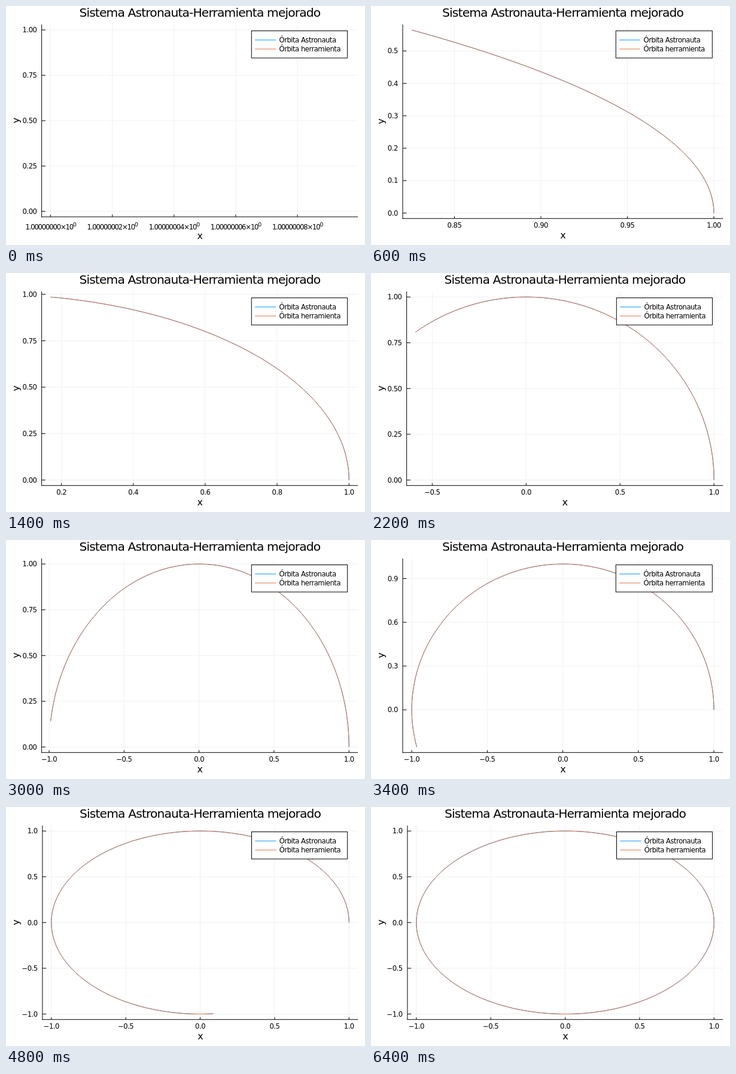
Animation, 600 px wide and 400 px high, one loop 6600 ms. Source, as an HTML page:

```html
<!DOCTYPE html>
<html lang="es">
<head>
<meta charset="utf-8">
<title>Sistema Astronauta-Herramienta</title>
<style>
html, body { margin: 0; width: 100%; height: 100%; overflow: hidden; background: #fff; }
svg { display: block; width: 600px; height: 400px; font-family: "DejaVu Sans", sans-serif; }
text { letter-spacing: -0.043em; }
.power { letter-spacing: -0.1em; }
</style>
</head>
<body>
<svg id="plot" viewBox="0 0 600 400" xmlns="http://www.w3.org/2000/svg"></svg>
<script>
const STEP_MS = 200, STEPS = 33, TURN = 0.2;
const TOP = 31, RIGHT = 588.2;
const BLUE = "#009afa", CORAL = "#e26f46";
const SMALL = 11.6, GUIDE = 16, TITLE = 20.3;
const svg = document.getElementById("plot");

const line = (x1, y1, x2, y2, color) =>
  `<path d="M${x1} ${y1}L${x2} ${y2}" stroke="${color}" fill="none"/>`;

const text = (x, y, str, size, anchor = "middle", extra = "") =>
  `<text x="${x}" y="${y}" font-size="${size}" text-anchor="${anchor}" ${extra}>${str}</text>`;

function widen(lo, hi) {
  const pad = 0.03 * (hi - lo);
  return [lo - pad, hi + pad];
}

// Picks the tick step by granularity, coverage, niceness and reach of zero.
function pickTicks([lo, hi]) {
  const nice = [[5, 0.9], [3, 0.2], [2.5, 0.5], [2, 0.7], [1, 1]];
  const span = hi - lo;
  let best = { score: -Infinity };
  for (let z = 0; z >= -4; z--) {
    for (const [q, quality] of nice) {
      const step = q * 10 ** z;
      const first = Math.ceil(lo / step), last = Math.floor(hi / step);
      const count = last - first + 1;
      if (count < 4 || count > 8) continue;
      const from = Math.min(0, first - 1), to = last + 1;
      const zero = (to - from) * step < 2 * span ? 1 : 0;
      const score = (1 - Math.abs(count - 5) / 5) / 4 + zero / 6 +
        0.5 * span / ((count - 1) * step) + quality / 4;
      if (score > best.score + 1e-9) best = { score, step, first, count };
    }
  }
  let digits = 1;
  while (Math.abs(best.step * 10 ** digits - Math.round(best.step * 10 ** digits)) > 1e-6) digits++;
  return Array.from({ length: best.count }, (_, i) => {
    const value = (best.first + i) * best.step;
    const label = Math.abs(value).toFixed(digits);
    return { value, label: (value < -1e-9 ? "\u2212" : "") + label };
  });
}

function limits(angle) {
  const x = angle > Math.PI ? -1 : Math.cos(angle);
  const yMax = angle > Math.PI / 2 ? 1 : Math.sin(angle);
  const yMin = angle > 1.5 * Math.PI ? -1 : Math.min(0, Math.sin(angle));
  return [widen(x, 1), widen(yMin, yMax)];
}

function leftEdge(ticks) {
  if (ticks[0].label[0] === "\u2212") return 60.9;
  return ticks[0].label.length > 3 ? 59.6 : 53;
}

function orbit(angle, px, py) {
  const n = Math.ceil(angle * 60);
  let d = "";
  for (let i = 0; i <= n; i++) {
    const a = angle * i / n;
    d += (i ? "L" : "M") + px(Math.cos(a)).toFixed(2) + " " + py(Math.sin(a)).toFixed(2);
  }
  return [BLUE, CORAL].map(c => `<path d="${d}" fill="none" stroke="${c}"/>`).join("");
}

function legend(left) {
  const x = 410.3 + (left - 59.6) * 0.16;
  const right = RIGHT - (RIGHT - left) / 30;
  const row = (y, color, label) =>
    line(x + 5.8, y, x + 41, y, color) + text(x + 46.3, y + 4.2, label, SMALL, "start");
  return `<rect x="${x}" y="41.6" width="${right - x}" height="45.4" fill="#fff" stroke="#000"/>` +
    row(56.9, BLUE, "Órbita Astronauta") + row(72, CORAL, "Órbita herramienta");
}

function draw(k) {
  const angle = k * TURN, start = k === 0;
  const bottom = start ? 352.9 : 355.7;
  // At the start x is measured in units of 1e-8 above one.
  const [xLim, yLim] = start ? [widen(0, 9.67), widen(0, 1)] : limits(angle);
  const yTicks = pickTicks(yLim);
  const xTicks = start
    ? [0, 2, 4, 6, 8].map(v => ({ value: v, label: `1.0000000${v}×10<tspan dy="-5" font-size="9.3">0</tspan>` }))
    : pickTicks(xLim);
  const left = leftEdge(yTicks);
  const px = v => left + (v - xLim[0]) / (xLim[1] - xLim[0]) * (RIGHT - left);
  const py = v => bottom - (v - yLim[0]) / (yLim[1] - yLim[0]) * (bottom - TOP);
  const midX = (left + RIGHT) / 2, midY = (TOP + bottom) / 2;
  const tickX = 0.012 * (RIGHT - left), tickY = 0.012 * (bottom - TOP);
  let grid = "", axes = "", labels = "";

  for (const t of xTicks) {
    const x = px(t.value);
    grid += line(x, TOP, x, bottom, "#f0f0f0");
    axes += line(x, bottom, x, bottom - tickY, "#000");
    labels += text(x, start ? 373.5 : 371.2, t.label, SMALL, "middle", start ? 'class="power"' : "");
  }
  for (const t of yTicks) {
    const y = py(t.value);
    grid += line(left, y, RIGHT, y, "#f0f0f0");
    axes += line(left, y, left + tickX, y, "#000");
    labels += text(left - 8.2, y + 4.2, t.label, SMALL, "end");
  }
  axes += line(left, TOP, left, bottom + 0.5, "#000") + line(left - 0.5, bottom, RIGHT, bottom, "#000");
  labels += text(midX, 18, "Sistema Astronauta-Herramienta mejorado", TITLE) +
    text(midX, start ? 390.4 : 389.1, "x", GUIDE) +
    text(0, 0, "y", GUIDE, "middle", `transform="translate(21.6 ${midY}) rotate(-90)"`);

  svg.innerHTML = grid + axes + labels + (start ? "" : orbit(Math.min(angle, 2 * Math.PI), px, py)) + legend(left);
}

let shown = -1;
const begin = performance.now();
function tick(now) {
  const k = Math.floor(Math.max(0, now - begin) / STEP_MS) % STEPS;
  if (k !== shown) draw(shown = k);
  requestAnimationFrame(tick);
}
tick(begin);
</script>
</body>
</html>
```
